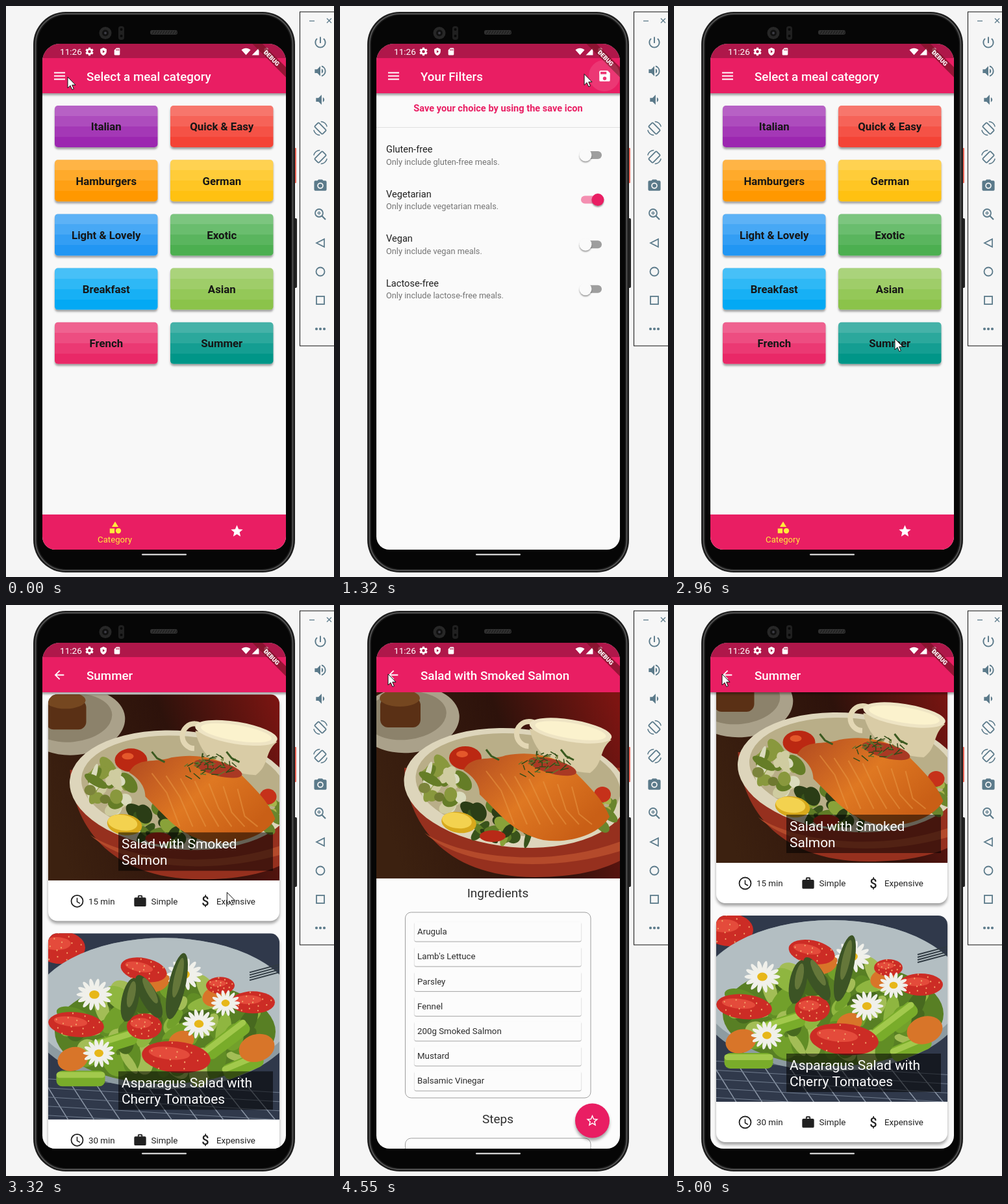
These frames come from a looping animation (505x877 px, 5530 ms). An HTML page with a canvas:

```html
<!DOCTYPE html>
<html lang="en">
<head>
<meta charset="utf-8">
<title>Meal app</title>
<style>
html, body { margin: 0; width: 100%; height: 100%; overflow: hidden; background: #f5f5f5; }
canvas { display: block; }
</style>
</head>
<body>
<canvas id="stage" width="505" height="877"></canvas>
<script>
const LOOP = 5530;
const PINK = '#e91e63', PAPER = '#fafafa', INK = '#212121', SLATE = '#5b7a8a';
const SCREEN = { x: 56, y: 58, w: 375, h: 777, cx: 243.5, cy: 446.5 };
const ICONS = {
  power: 'M13 3h-2v10h2V3zm4.83 2.17l-1.42 1.42A6.92 6.92 0 0 1 19 12a7 7 0 0 1-14 0c0-2.18.99-4.13 2.56-5.41L6.17 5.17A8.93 8.93 0 0 0 3 12a9 9 0 0 0 18 0c0-2.74-1.23-5.18-3.17-6.83z',
  loud: 'M3 9v6h4l5 5V4L7 9H3zm13.5 3A4.5 4.5 0 0 0 14 7.97v8.05A4.5 4.5 0 0 0 16.5 12zM14 3.23v2.06a7 7 0 0 1 0 13.42v2.06a9 9 0 0 0 0-17.54z',
  quiet: 'M18.5 12A4.5 4.5 0 0 0 16 7.97v8.05A4.5 4.5 0 0 0 18.5 12zM5 9v6h4l5 5V4L9 9H5z',
  camera: 'M9 2L7.2 4H4a2 2 0 0 0-2 2v12a2 2 0 0 0 2 2h16a2 2 0 0 0 2-2V6a2 2 0 0 0-2-2h-3.2L15 2zM12 7a5 5 0 0 1 0 10a5 5 0 0 1 0-10zM12 8.8a3.2 3.2 0 0 0 0 6.4a3.2 3.2 0 0 0 0-6.4z',
  food: 'M16 6v8h3v8h2V2c-2.76 0-5 2.24-5 4zm-5 3H9V2H7v7H5V2H3v7c0 2.1 1.7 3.8 3.75 4V22h2.5v-9C11.3 12.8 13 11.1 13 9V2h-2z',
  shapes: 'M12 2l-5.5 9h11zM3 13.5h8v8H3zM17.5 13a4.5 4.5 0 0 1 0 9a4.5 4.5 0 0 1 0-9z',
  star: 'M12 17.27L18.18 21l-1.64-7.03L22 9.24l-7.19-.61L12 2 9.19 8.63 2 9.24l5.46 4.73L5.82 21z',
  starHole: 'M12 15.4l-3.76 2.27 1-4.28-3.32-2.88 4.38-.38L12 6.1l1.71 4.04 4.38.38-3.32 2.88 1 4.28z',
  save: 'M17 3H5a2 2 0 0 0-2 2v14a2 2 0 0 0 2 2h14a2 2 0 0 0 2-2V7zM12 13a3 3 0 0 1 0 6a3 3 0 0 1 0-6zM15 9H5V5h10z',
  back: 'M20 11H7.83l5.59-5.59L12 4l-8 8 8 8 1.41-1.41L7.83 13H20z',
  work: 'M20 6h-4V4a2 2 0 0 0-2-2h-4a2 2 0 0 0-2 2v2H4a2 2 0 0 0-2 2v11a2 2 0 0 0 2 2h16a2 2 0 0 0 2-2V8a2 2 0 0 0-2-2zM14 6h-4V4h4z',
  shield: 'M12 1L3 5v6c0 5.5 3.8 10.7 9 12 5.2-1.3 9-6.5 9-12V5zM10 8l6 4-6 4z',
  sdCard: 'M18 2h-8L4 8v12a2 2 0 0 0 2 2h12a2 2 0 0 0 2-2V4a2 2 0 0 0-2-2zM9 5v4h2V5zM12.500 5v4h2V5zM16 5v4h2V5z',
  wifi: 'M12 21L0 7.500C7 1.500 17 1.500 24 7.500z',
  signal: 'M2 22h20V2z',
  battery: 'M9 2h6v2h2v18H7V4h2z',
  pointer: 'M0 0V17L4 13.200L6.800 19.500L9.400 18.400L6.700 12.300H12z'
};

const main = document.getElementById('stage').getContext('2d');
const buffer = document.createElement('canvas');
buffer.width = 505; buffer.height = 877;
const spare = buffer.getContext('2d');
let g = main;

const clamp = v => Math.max(0, Math.min(1, v));
const mix = (a, b, p) => a + (b - a) * p;
const smooth = p => p * p * (3 - 2 * p);

function isolated(draw) { g.save(); draw(); g.restore(); }

function rect(x, y, w, h, color, r = 0) {
  g.fillStyle = color;
  g.beginPath(); g.roundRect(x, y, w, h, r); g.fill();
}

function raised(x, y, w, h, color, r, lift = 3) {
  isolated(() => {
    g.shadowColor = 'rgba(0,0,0,.35)'; g.shadowBlur = lift; g.shadowOffsetY = lift;
    rect(x, y, w, h, color, r);
  });
}

function blob(x, y, rx, ry, color, turn = 0) {
  g.fillStyle = color;
  g.beginPath(); g.ellipse(x, y, rx, ry, turn, 0, 7); g.fill();
}

function line(points, color, width) {
  g.strokeStyle = color; g.lineWidth = width;
  g.beginPath(); points.forEach(p => g.lineTo(...p)); g.stroke();
}

function ring(x, y, r, color, width, from = 0, to = 2 * Math.PI) {
  g.strokeStyle = color; g.lineWidth = width;
  g.beginPath(); g.arc(x, y, r, from, to); g.stroke();
}

function shape(d, color) { g.fillStyle = color; g.fill(new Path2D(d), 'evenodd'); }

function icon(name, x, y, size, color) {
  isolated(() => {
    g.translate(x - size / 2, y - size / 2); g.scale(size / 24, size / 24);
    shape(ICONS[name], color);
  });
}

function text(s, x, y, size, color, weight = 400, align = 'left') {
  g.font = `${weight} ${size}px Roboto, sans-serif`;
  g.fillStyle = color; g.textAlign = align;
  g.fillText(s, x, y + size * .355);
}

function gear(x, y, r, color) {
  ring(x, y, r * .57, color, r * .42);
  for (let i = 0; i < 6; i++) isolated(() => {
    g.translate(x, y); g.rotate(i * Math.PI / 3);
    rect(-r * .25, -r, r * .5, r * .45, color);
  });
}

function randomizer(seed) {
  return () => (seed = (seed * 16807) % 2147483647) / 2147483647;
}

function scatter(seed, count, x, y, rx, ry, size, colors) {
  const rnd = randomizer(seed);
  for (let i = 0; i < count; i++) {
    const a = rnd() * 6.28, d = Math.sqrt(rnd());
    blob(x + rx * d * Math.cos(a), y + ry * d * Math.sin(a),
      size * (.5 + rnd()), size * (.3 + rnd() * .5), colors[i % colors.length], rnd() * 3);
  }
}

// Food pictures
function photo(draw, x, y, w, h, r = 0) {
  isolated(() => {
    g.beginPath(); g.roundRect(x, y, w, h, [r, r, 0, 0]); g.clip();
    g.translate(x + w / 2 - SCREEN.cx, y);
    draw();
  });
}

function salmonSalad() {
  g.translate(0, -134);
  const table = g.createLinearGradient(56, 300, 431, 160);
  table.addColorStop(0, '#3c2110'); table.addColorStop(.55, '#2d120b'); table.addColorStop(1, '#7d1512');
  rect(56, 134, 375, 286, table);
  blob(106, 176, 78, 51, '#aaa18a', -.1);
  blob(101, 170, 63, 37, '#8c826b', -.1);
  rect(62, 142, 62, 46, '#5a3015', 12);
  blob(92, 143, 31, 13, '#754720');
  shape('M99 250C103 330 155 418 300 418C370 418 410 405 440 388V250z', '#96301e');
  shape('M130 350C190 390 330 405 440 360V375C330 412 190 405 130 350z', '#b44a2b');
  blob(271, 281, 173, 91, '#ddd5bb', .09);
  blob(274, 276, 158, 78, '#b9ae88', .09);
  scatter(9, 26, 160, 278, 36, 35, 14, ['#cfcca0', '#89983d', '#dadbbd', '#657d27']);
  scatter(17, 36, 250, 330, 62, 32, 15, ['#39531b', '#5f7c26', '#89a239', '#2b3d16']);
  scatter(5, 12, 402, 312, 20, 28, 12, ['#6a852d', '#a7b34c']);
  ring(291, 198, 19, '#e3d7b4', 8, 1.6, 5.3);
  shape('M292 190C300 232 335 255 385 258C407 242 398 222 418 207z', '#d9cca6');
  blob(355, 193, 64, 17, '#eee4c4', .16);
  blob(355, 193, 55, 12, '#fbf2cd', .16);
  blob(193, 235, 25, 18, '#bb2812');
  blob(188, 229, 9, 5, '#e4582b');
  blob(404, 291, 13, 12, '#c6311a');
  blob(235, 355, 20, 9, '#b82a17');
  const fish = g.createLinearGradient(220, 230, 350, 365);
  fish.addColorStop(0, '#b95221'); fish.addColorStop(.5, '#df7822'); fish.addColorStop(1, '#c95f16');
  shape('M190 254C203 229 230 240 255 231C298 223 330 234 354 248C375 272 402 292 415 325C400 352 355 367 313 361C265 350 246 320 215 291C215 275 204 262 190 254z', fish);
  for (let i = 0; i < 7; i++) line([[225 + i * 22, 255 + i * 4], [248 + i * 20, 285 + i * 6], [268 + i * 20, 337]], '#e9984488', 2);
  blob(327, 248, 38, 11, '#a93924', .25);
  blob(183, 334, 27, 16, '#d8a91c', .15);
  blob(180, 331, 23, 12, '#f3d24f', .15);
  blob(153, 295, 8, 7, '#6f7930'); blob(130, 281, 9, 8, '#7c843b');
  const rnd = randomizer(42);
  for (let i = 0; i < 55; i++) {
    const x = 275 + rnd() * 75, y = 229 + rnd() * 30;
    line([[x, y], [x + rnd() * 24 - 12, y + rnd() * 18 - 9]], i % 3 ? '#304c18' : '#63752c', 1.5);
  }
  [225, 340].forEach(x => line([[x, 222], [x + 8, 232], [x + 20, 238]], '#3b5a20', 3));
}

function daisy(x, y, r) {
  for (let i = 0; i < 14; i++) {
    const a = i * Math.PI / 7;
    blob(x + Math.cos(a) * r * .6, y + Math.sin(a) * r * .5, r * .42, r * .13, '#f0f0ea', a);
  }
  blob(x, y, r * .29, r * .24, '#e7b719');
}

function berry(x, y, rx, ry, turn = 0) {
  blob(x, y, rx, ry, '#cc2c25', turn);
  blob(x - rx * .2, y - ry * .25, rx * .6, ry * .4, '#e44b3b', turn);
  for (let i = 0; i < 16; i++) {
    const a = i * 2.4, d = Math.sqrt(i / 18);
    blob(x + Math.cos(a) * rx * d, y + Math.sin(a) * ry * d, 1, 1.3, '#f2a36a');
  }
}

function asparagusSalad() {
  g.translate(.5, -477);
  rect(56, 477, 375, 290, '#30394b');
  for (let i = 0; i < 9; i++) {
    line([[50 + i * 38, 690], [100 + i * 40, 770]], '#8b96a6', 1.5);
    line([[56, 700 + i * 14], [431, 722 + i * 14]], '#6f7b8d', 1);
  }
  berry(85, 499, 37, 25);
  blob(243, 600, 208, 116, '#8d9ba1');
  blob(243, 592, 202, 108, '#b3bec2');
  blob(245, 628, 170, 80, '#587f24');
  scatter(31, 75, 245, 627, 152, 67, 22, ['#72a02b', '#8fb640', '#47691f', '#a3bd56', '#618d25']);
  for (const [x, y, w, a] of [[165, 645, 75, -.3], [340, 640, 80, -.65], [115, 700, 75, 0], [365, 680, 65, -.4]])
    isolated(() => { g.translate(x, y); g.rotate(a); rect(-w / 2, -12, w, 24, '#79ac2a', 9); rect(-w / 2, -10, w, 9, '#a2c94c', 5); });
  for (const [x, y, rx] of [[103, 670, 24], [322, 574, 20], [386, 653, 28], [230, 550, 22], [270, 642, 20]])
    blob(x, y, rx, rx * .75, '#d87529', -.3);
  berry(108, 617, 43, 19, .1);
  berry(212, 533, 36, 18, .2);
  berry(380, 583, 34, 17);
  berry(330, 557, 22, 13);
  berry(213, 620, 27, 20);
  daisy(275, 540, 27); daisy(136, 571, 27); daisy(338, 584, 22); daisy(297, 616, 25); daisy(143, 661, 24);
  for (const [x, y, len, a] of [[263, 558, 52, .22], [220, 574, 37, -.5], [191, 579, 34, .2]]) {
    blob(x, y, 13, len, '#3c5425', a);
    blob(x + 2, y - len * .25, 6, len * .6, '#65773a', a);
  }
  berry(262, 667, 53, 24, .1);
  for (let i = 0; i < 4; i++) line([[375, 537 + i * 4], [431, 522 + i * 4]], '#303a42', 2);
}

// App pages
function appBar(title, back) {
  raised(50, 50, 390, 84, PINK, 0);
  if (back) icon('back', 82, 107.5, 22, '#fff');
  else for (let i = 0; i < 3; i++) rect(74, 101.500 + i * 5, 17, 2, '#fff');
  text(title, 124, 108, 18.8, '#fff', 500);
}

const CATEGORIES = [
  ['Italian', 156, 39, 176], ['Quick & Easy', 244, 67, 54],
  ['Hamburgers', 255, 152, 0], ['German', 255, 193, 17],
  ['Light & Lovely', 33, 150, 243], ['Exotic', 76, 175, 80],
  ['Breakfast', 3, 169, 244], ['Asian', 139, 195, 74],
  ['French', 233, 40, 103], ['Summer', 0, 150, 136]
];

function categoryPage() {
  rect(56, 58, 375, 777, '#f8f8f8');
  CATEGORIES.forEach(([name, ...rgb], i) => {
    const x = 75 + (i % 2) * 178, y = 153 + (i >> 1) * 83.2;
    raised(x, y, 158.5, 64, '#ddd', 5);
    const fade = g.createLinearGradient(0, y, 0, y + 64);
    [.73, .83, .92, 1].forEach((strength, band) => {
      const tone = `rgb(${rgb.map(c => mix(255, c, strength))})`;
      fade.addColorStop(band / 4, tone); fade.addColorStop(band / 4 + .25, tone);
    });
    rect(x, y, 158.5, 64, fade, 5);
    text(name, x + 79.25, y + 32.5, 16.8, '#161616', 700, 'center');
  });
  appBar('Select a meal category');
  rect(56, 781, 375, 54, PINK);
  icon('shapes', 168, 801, 22, '#ffeb3b');
  text('Category', 167.5, 819, 13.2, '#ffeb3b', 400, 'center');
  icon('star', 355.500, 806.500, 22, '#fff');
}

function filterPage(t) {
  rect(56, 58, 375, 777, PAPER);
  text('Save your choice by using the save icon', 243.5, 156.5, 14.6, PINK, 700, 'center');
  rect(56, 186, 375, 1, '#e0e0e0');
  ['Gluten-free', 'Vegetarian', 'Vegan', 'Lactose-free'].forEach((name, i) => {
    const y = 229 + i * 68.600, on = i === 1 ? smooth(clamp((t - 1010) / 90)) : 0;
    text(name, 71, y - 9, 14.6, INK);
    text(`Only include ${name.toLowerCase()} meals.`, 71, y + 10, 12.8, '#757575');
    rect(371, y - 6, 32, 12, on > .5 ? '#f48fb1' : '#9e9e9e', 6);
    raised(mix(368.5, 387.5, on), y - 9.5, 19, 19, on > .5 ? PINK : PAPER, 9.5, 2);
  });
  appBar('Your Filters');
  icon('save', 407.5, 107.5, 22, '#fff');
}

function mealCard(y, draw, title, minutes) {
  raised(65, y, 356, 348, '#fff', 14, 4);
  photo(draw, 65, y, 356, 286, 14);
  rect(173, y + 212, 238, 59, 'rgba(0,0,0,.54)');
  title.forEach((s, i) => text(s, 178, y + 229.5 + i * 25, 20.900, '#fff'));
  const row = y + 317.5;
  ring(109.5, row, 9, INK, 1.8);
  line([[109.5, row - 5], [109.5, row + 1], [114, row + 3.5]], INK, 1.6);
  text(minutes + ' min', 127, row, 13.4, INK);
  icon('work', 206.5, row, 22, INK);
  text('Simple', 223.5, row, 13.4, INK);
  text('$', 307, row, 20, INK, 500, 'center');
  text('Expensive', 324, row, 13.4, INK);
}

function summerPage(t) {
  const scroll = 33 * smooth(clamp((t - 3300) / 80));
  rect(56, 58, 375, 777, PAPER);
  mealCard(143 - scroll, salmonSalad, ['Salad with Smoked', 'Salmon'], 15);
  mealCard(510 - scroll, asparagusSalad, ['Asparagus Salad with', 'Cherry Tomatoes'], 30);
  appBar('Summer', true);
}

function outline(x, y, w, h) {
  g.strokeStyle = '#9e9e9e'; g.lineWidth = 1;
  g.beginPath(); g.roundRect(x, y, w, h, 9); g.stroke();
}

function recipePage() {
  rect(56, 58, 375, 777, '#fcfcfc');
  appBar('Salad with Smoked Salmon', true);
  photo(salmonSalad, 56, 134, 375, 286);
  text('Ingredients', 243, 442, 19, '#303030', 400, 'center');
  outline(100.5, 472, 285.5, 285);
  ['Arugula', "Lamb's Lettuce", 'Parsley', 'Fennel', '200g Smoked Salmon', 'Mustard', 'Balsamic Vinegar'].forEach((name, i) => {
    const y = 501.5 + i * 38.2;
    raised(114.5, y - 15, 257, 30, '#fcfcfc', 3, 1);
    text(name, 119, y, 13.3, '#2c2c2c');
  });
  text('Steps', 243, 789, 19, '#303030', 400, 'center');
  isolated(() => {
    g.beginPath(); g.rect(56, 800, 375, 35); g.clip();
    outline(100.5, 819, 285.5, 100);
  });
  raised(362, 765.5, 53, 53, PINK, 26.5, 4);
  icon('star', 388.5, 792, 22, '#fff');
  icon('starHole', 388.5, 792, 22, PINK);
}

const drawerAmount = (t, start) => 1 - (1 - clamp((t - start) / 246)) ** 3;

function drawer(open) {
  if (!open) return;
  rect(56, 58, 375, 777, `rgba(0,0,0,${.54 * open})`);
  isolated(() => {
    g.translate(-290 * (1 - open), 0);
    rect(56, 58, 290, 777, PAPER);
    rect(56, 58, 290, 95, PINK);
    text('Settings', 69, 130, 18.900, '#fff');
    icon('food', 82.5, 195, 22, PINK);
    text('View Meals', 124.5, 195.5, 13.1, INK, 700);
    gear(82.5, 264, 10, PINK);
    text('Choose / Filter meal type', 124.5, 264.5, 13.1, INK, 700);
    rect(56, 229.5, 290, 1, '#e8e8e8');
    rect(56, 298, 290, 1, '#eee');
  });
}

// Page changes
const SCENES = [
  { start: -1000, time: 300, draw(t) { categoryPage(); drawer(drawerAmount(t, 70)); } },
  { start: 660, time: 300, draw(t) { filterPage(t); drawer(drawerAmount(t, 1800)); } },
  { start: 2160, time: 170, draw: categoryPage },
  { start: 3000, time: 300, draw: summerPage },
  { start: 3490, time: 300, draw: recipePage },
  { start: 4690, time: 300, draw: summerPage, pop: true }
];

const bezier = (a, b, c, d, s) => {
  const q = 1 - s;
  return a * q * q * q + 3 * b * s * q * q + 3 * c * s * s * q + d * s * s * s;
};

// Fast start, very slow end: two joined cubic curves
function zoomEase(p) {
  const early = p < 1 / 6;
  const xs = early ? [0, .05, .1333, .1667] : [.1667, .2083, .25, 1];
  const ys = early ? [0, 0, .06, .4] : [.4, .82, 1, 1];
  let lo = 0, hi = 1;
  for (let i = 0; i < 18; i++) {
    const mid = (lo + hi) / 2;
    if (bezier(...xs, mid) < p) lo = mid; else hi = mid;
  }
  return bezier(...ys, lo);
}

function layer(scene, t, scale, alpha = 1) {
  if (alpha <= 0) return;
  const faded = alpha < 1;
  if (faded) { g = spare; g.clearRect(0, 0, 505, 877); }
  isolated(() => {
    g.translate(SCREEN.cx, SCREEN.cy); g.scale(scale, scale); g.translate(-SCREEN.cx, -SCREEN.cy);
    g.beginPath(); g.rect(SCREEN.x, SCREEN.y, SCREEN.w, SCREEN.h); g.clip();
    scene.draw(t);
  });
  if (!faded) return;
  g = main;
  g.globalAlpha = alpha; g.drawImage(buffer, 0, 0); g.globalAlpha = 1;
}

function pages(t) {
  const i = SCENES.findLastIndex(s => t >= s.start);
  const now = SCENES[i], before = SCENES[i - 1], p = (t - now.start) / now.time;
  if (p >= 1) return layer(now, t, 1);
  const e = zoomEase(p);
  if (now.pop) {
    layer(now, t, mix(1.1, 1, e));
    layer(before, t, mix(1, .9, e), 1 - clamp((p - .0825) / .125));
  } else {
    layer(before, t, mix(1, 1.05, e));
    rect(56, 58, 375, 777, `rgba(0,0,0,${.6 * clamp((p - .2075) / .21)})`);
    layer(now, t, mix(.85, 1, e), clamp((p - .125) / .125));
  }
}

// Device and emulator panel
function phone() {
  rect(443, 218, 4, 54, '#f0685a', 1);
  rect(443, 326, 5, 107, '#222', 2);
  rect(42, 9, 403, 861, '#1d1d1d', 50);
  g.strokeStyle = '#5c5c5c'; g.lineWidth = 1.5;
  g.beginPath(); g.roundRect(45.5, 12, 396, 855, 47); g.stroke();
  rect(48, 14, 391, 851, '#060606', 45);
  blob(153, 41.5, 9.5, 9.5, '#272727'); blob(153, 41.5, 5, 5, '#111'); blob(153, 41.5, 2, 2, '#3c3c44');
  rect(173, 31, 9, 21, '#202020', 4); blob(177.5, 36, 2, 2, '#080808'); blob(177.5, 46, 2, 2, '#080808');
  rect(222, 37, 42, 7, '#303030', 3);
  for (let x = 225; x < 262; x += 4) line([[x, 43], [x + 3, 38]], '#161616', 1);
  rect(209, 841.5, 69, 2, '#f4f4f4', 1);
}

function rotateIcon(y, side) {
  isolated(() => {
    g.translate(484, y); g.scale(side, 1);
    ring(0, 0, 10.5, SLATE, 1.6, -1.5, -.25);
    ring(0, 0, 10.5, SLATE, 1.6, 1.64, 2.9);
    g.rotate(-Math.PI / 4);
    g.lineWidth = 1.8;
    g.beginPath(); g.roundRect(-4.5, -8.5, 9, 17, 1.5); g.stroke();
  });
}

function panel() {
  rect(452, 8.5, 60, 514, '#111');
  rect(453, 9.5, 60, 512, '#f6f6f6');
  line([[467, 23], [475, 23]], SLATE, 1.3);
  line([[494, 19], [501, 26]], SLATE, 1.3);
  line([[501, 19], [494, 26]], SLATE, 1.3);
  ['power', 'loud', 'quiet'].forEach((name, i) => icon(name, 484, 56 + i * 44, 23, SLATE));
  rotateIcon(188, 1);
  rotateIcon(232, -1);
  icon('camera', 484, 276, 23, SLATE);
  ring(482, 318, 6, SLATE, 1.8);
  line([[486, 322], [492, 328]], SLATE, 2.2);
  line([[479, 318], [485, 318]], SLATE, 1.3);
  line([[482, 315], [482, 321]], SLATE, 1.3);
  line([[490, 358], [490, 370], [478, 364], [490, 358], [490, 370]], SLATE, 1.7);
  ring(484, 408, 6.5, SLATE, 1.8);
  g.strokeRect(478, 446, 12, 12);
  [478, 484, 490].forEach(x => blob(x, 496, 2.1, 2.1, SLATE));
}

function banner(t) {
  const dimmed = (t > 100 && t < 760) || (t > 1850 && t < 2200);
  isolated(() => {
    g.translate(431, 58); g.rotate(Math.PI / 4);
    rect(-60, 25.5, 120, 11, dimmed ? '#b71f28' : 'rgba(130,18,42,.8)');
    text('DEBUG', 0, 31, 9.3, '#fff', 900, 'center');
  });
}

function statusBar() {
  rect(56, 58, 375, 22, 'rgba(0,0,0,.25)');
  text('11:26', 83, 70.5, 13.6, '#fff');
  gear(128.5, 70, 6.2, '#fff');
  icon('shield', 150, 70, 13, '#fff');
  icon('sdCard', 171, 70, 13, '#fff');
  icon('wifi', 369.5, 70, 14, '#fff');
  icon('signal', 384, 70, 13, '#fff');
  icon('battery', 400.5, 70, 14, '#fff');
}

// Pointer path: time, x, y
const PATH = [
  [0, 95, 109], [330, 95, 109], [520, 181, 275], [720, 181, 275], [930, 388, 297], [1030, 388, 297],
  [1125, 405, 104], [1260, 405, 104], [1590, 83, 109], [1850, 83, 109], [2070, 122, 203], [2180, 122, 203],
  [2310, 340, 511], [3290, 340, 511], [3380, 341, 257], [3640, 341, 257], [3930, 74, 106], [LOOP, 74, 106]
];
const CLICKS = [[30, 90], [630, 670], [990, 1040], [1190, 1260], [1770, 1830], [2075, 2160], [2990, 3040], [3530, 3580], [4680, 4740]];
// Start, x, y, radius, colour
const RIPPLES = [
  [630, 181, 275, 16, '0,0,0'], [1190, 407, 107, 24, '255,255,255'],
  [1770, 82, 107, 24, '255,255,255'], [4680, 82, 107, 24, '255,255,255']
];

function ripples(t) {
  for (const [start, x, y, r, rgb] of RIPPLES) {
    const p = (t - start) / 260;
    if (p <= 0 || p >= 1) continue;
    const size = r * clamp(p * 4.5);
    blob(x, y, size, size, `rgba(${rgb},${.15 * clamp((1 - p) * 1.5)})`);
  }
}

function pointer(t) {
  const i = PATH.findLastIndex(k => t >= k[0]);
  const a = PATH[i], b = PATH[i + 1] || a;
  const p = smooth(clamp((t - a[0]) / (b[0] - a[0] || 1)));
  const x = mix(a[1], b[1], p), y = mix(a[2], b[2], p);
  if (CLICKS.some(([from, to]) => t >= from && t < to)) blob(x - .5, y - .5, 12, 12, 'rgba(255,245,60,.65)');
  isolated(() => {
    g.translate(x, y);
    shape(ICONS.pointer, '#fff');
    g.strokeStyle = '#111'; g.lineWidth = 1;
    g.stroke(new Path2D(ICONS.pointer));
  });
}

function frame(now) {
  const t = now % LOOP;
  rect(0, 0, 505, 877, '#f5f5f5');
  panel();
  phone();
  isolated(() => {
    g.beginPath(); g.roundRect(SCREEN.x, SCREEN.y, SCREEN.w, SCREEN.h, [27, 27, 20, 20]); g.clip();
    pages(t);
    statusBar();
    banner(t);
    ripples(t);
  });
  pointer(t);
}

const began = performance.now();
function tick() {
  frame(performance.now() - began);
  requestAnimationFrame(tick);
}
tick();
</script>
</body>
</html>
```
